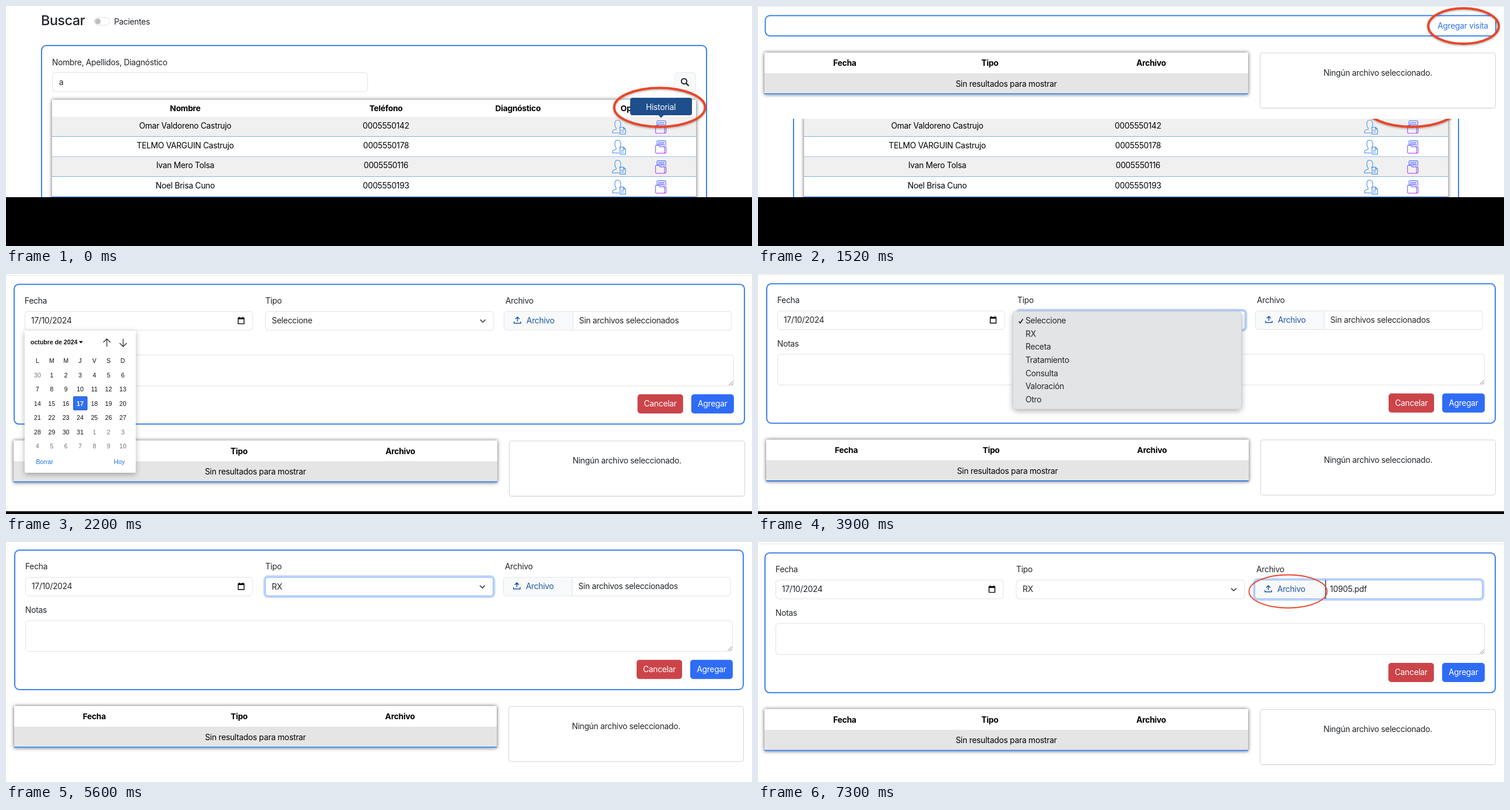
Write an HTML page that moves like this. It is 1280 by 413 pixels and loops after 8000 ms.

```html
<!DOCTYPE html>
<html lang="es">
<head>
<meta charset="utf-8">
<title>Agregar visita</title>
<style>
  html, body { margin: 0; width: 100%; height: 100%; overflow: hidden; background: #fff; }
  svg { display: block; }
  text { font: 13.8px Inter, "Open Sans", sans-serif; letter-spacing: -.25px; fill: #212529; }
  .table { fill: #000; }
  .bold { font-weight: 700; fill: #000; }
  .mid { text-anchor: middle; }
  .title { font-size: 23.5px; font-weight: 500; letter-spacing: -.5px; }
  .white { fill: #fff; }
  .link { fill: #2f74e8; }
  .navy { fill: #1f56a5; }
  .cal { font: 10.6px "Liberation Sans", Arial, sans-serif; letter-spacing: 0; fill: #111; }
  .cal.strong { font-weight: 700; }
  .cal.dim { fill: #757575; }
  .cal.link { fill: #1a6fe0; }
  .cal.white { fill: #fff; }
</style>
</head>
<body>
<svg id="stage" width="1280" height="413" viewBox="0 0 1280 413"></svg>
<script>
const BLUE = '#3b82ec', BORDER = '#dee2e6', RED = '#e8472a', INK = '#212529';

const text = (x, y, s, cls = '') => `<text x="${x}" y="${y}" class="${cls}">${s}</text>`;
const mid = (x, y, s, cls = '') => text(x, y, s, 'mid ' + cls);
const box = (x1, y1, x2, y2, r, fill, stroke = 'none', extra = '') =>
  `<rect x="${x1}" y="${y1}" width="${x2 - x1}" height="${y2 - y1}" rx="${r}" fill="${fill}" stroke="${stroke}" ${extra}/>`;
const line = (d, stroke, width = 1, extra = '') =>
  `<path d="${d}" fill="none" stroke="${stroke}" stroke-width="${width}" ${extra}/>`;
const ring = (cx, cy, rx, ry, width, extra = '') =>
  `<ellipse cx="${cx}" cy="${cy}" rx="${rx}" ry="${ry}" fill="none" stroke="${RED}" stroke-width="${width}" ${extra}/>`;
const panel = (x1, y1, x2, y2) => box(x1, y1, x2, y2, 8, '#fff', BLUE, 'stroke-width="2"');
const field = (x1, y1, x2, y2) => box(x1, y1, x2, y2, 5, '#fff', BORDER);
const place = (x, y, scale, content) =>
  `<g transform="translate(${x} ${y}) scale(${scale}) translate(-14 -16)">${content}</g>`;
const focus = (x1, y1, x2, y2) =>
  box(x1 - 1.5, y1 - 1.5, x2 + 1.5, y2 + 1.5, 6, 'none', '#c2d7fe', 'stroke-width="4"') +
  box(x1, y1, x2, y2, 5, 'none', '#86b7fe');

const defs = `<defs>
  <filter id="glow" x="-10%" y="-30%" width="120%" height="160%">
    <feDropShadow dx="0" dy="0" stdDeviation="3" flood-color="#000" flood-opacity=".65"/></filter>
  <filter id="lift" x="-20%" y="-20%" width="140%" height="140%">
    <feDropShadow dx="0" dy="3" stdDeviation="5" flood-color="#000" flood-opacity=".3"/></filter>
  <filter id="soft" x="-10%" y="-20%" width="120%" height="140%">
    <feDropShadow dx="0" dy="1.5" stdDeviation="1.5" flood-color="#000" flood-opacity=".3"/></filter>
  <linearGradient id="violet" gradientUnits="userSpaceOnUse" x1="0" y1="0" x2="0" y2="23">
    <stop offset="0" stop-color="#4a7cf2"/><stop offset="1" stop-color="#c04df5"/></linearGradient>
</defs>`;

// ---- patient search -------------------------------------------------
const patients = [
  ['Omar Valdoreno Castrujo', '0005550142'],
  ['TELMO VARGUIN Castrujo', '0005550178'],
  ['Ivan Mero Tolsa', '0005550116'],
  ['Noel Brisa Cuno', '0005550193'],
];

const personIcon = (x, y) => `<g transform="translate(${x} ${y})">` +
  line('M7 14V16Q.5 17.5 .5 20.5V22.5H12M7 14C4 11 3 .5 9.5 .5S16 11 12.5 14', '#5a9cee', 1.2) +
  line('M13.5 12.5H19.5L23 16V24.5H13.5ZM19.5 12.5V16H23M15.5 18H20M15.5 21H20', '#4a90ea', 1.2) + '</g>';
const folderIcon = (x, y) => `<g transform="translate(${x} ${y})">` +
  line('M3 8V2Q3 .5 4.5 .5H17Q18 .5 18 2V10M5 3.5H16M5 8V6H15V10M7 8H13' +
       'M1.5 8.5H6L8 11H16V22H2.5Q.5 22 .5 20V9.5Q.5 8.5 1.5 8.5ZM16 12H18.5V20Q18.5 22 16 22', 'url(#violet)', 1.2) + '</g>';

function search() {
  const rowHeight = 34.4;
  const rows = patients.map(([name, phone], i) => {
    const y = 190.5 + i * rowHeight, base = y + 20;
    return box(79, y, 1184, y + rowHeight, 0, i % 2 ? '#fff' : '#f0f0f0') +
      line(`M79 ${y + rowHeight}H1184`, '#4a8fe6', 1.2) +
      mid(307.5, base, name, 'table') + mid(652, base, phone, 'table') +
      personIcon(1040, y + 5.5) + folderIcon(1114, y + 6.5);
  }).join('');
  return text(60, 33, 'Buscar', 'title') +
    box(151, 19.5, 178, 33, 6.75, '#fff', '#dcdee1') +
    '<circle cx="157.5" cy="26.5" r="5" fill="#bfbfbf"/>' +
    text(185.5, 32, 'Pacientes') +
    panel(61, 68, 1202, 420) +
    text(79, 102, 'Nombre, Apellidos, Diagnóstico') +
    field(79.5, 114.5, 620.5, 147.5) + text(91, 136, 'a') +
    box(1147, 114.5, 1183.5, 147.5, 5, '#f8f9fa', '#e6e8ea') +
    line('M1166.8 132.8L1171.5 137.5', INK, 2.4) +
    `<circle cx="1163.5" cy="129.5" r="4.6" fill="none" stroke="${INK}" stroke-width="2"/>` +
    box(79, 161.5, 1184, 420, 0, '#fff', 'none', 'filter="url(#glow)"') +
    mid(307.5, 181, 'Nombre', 'bold') + mid(652, 181, 'Teléfono', 'bold') +
    mid(878.5, 181, 'Diagnóstico', 'bold') + text(1054.5, 181, 'Opciones', 'bold') +
    rows +
    ring(1121.5, 174.5, 78, 33.5, 4, 'filter="url(#soft)"') +
    box(1071, 158, 1177, 188, 4, '#1f4e8c') +
    '<path d="M1119 187.5H1129L1124 192.5Z" fill="#1f4e8c"/>' +
    mid(1123.5, 178.5, 'Historial', 'white') +
    box(0, 329, 1280, 413, 0, '#000');
}

// ---- visit history --------------------------------------------------
const results = () =>
  box(14, 285, 842, 357, 0, '#fff', 'none', 'filter="url(#glow)"') +
  box(14, 320.5, 842, 356, 0, '#e5e5e5') + line('M14 356H842', BLUE, 2) +
  mid(151.5, 308, 'Fecha', 'bold') + mid(400, 308, 'Tipo', 'bold') + mid(676, 308, 'Archivo', 'bold') +
  mid(428, 343.5, 'Sin resultados para mostrar', 'table') +
  box(862.5, 285.5, 1265.5, 380.5, 4, '#fff', '#d0d3d6') +
  mid(1064, 324.5, 'Ningún archivo seleccionado.');

function history() {
  return search() + box(0, 0, 1280, 194, 0, '#fff') + line('M0 1H1280', '#e4e6e8') +
    panel(12.5, 16.5, 1266, 51.5) + text(1166, 39, 'Agregar visita', 'link') +
    place(11, -189.5, 1.0024, results()) +
    ring(1210.5, 34.5, 60.5, 30.5, 4, 'filter="url(#soft)"');
}

// ---- visit form -----------------------------------------------------
function form({ type = 'Seleccione', file = 'Sin archivos seleccionados', typeFocus, fileFocus }) {
  const dateIcon = line('M398.5 75H408.5V84.5H398.5Z', '#000', 1.4) + line('M398 75.3H409', '#000', 3) +
    line('M400.5 72.5V75M406.5 72.5V75', '#000', 1.4);
  const uploadIcon = line('M870.8 80.5V83.5H882.2V80.5M876.5 80.5V73M873 76.3L876.5 72.8L880 76.3',
    '#1f56a5', 1.5, 'stroke-linejoin="round"');
  return line('M-20 1.3H1300', '#e4e6e8') +
    panel(15, 16.7, 1265, 256.7) +
    text(33, 50, 'Fecha') + text(445, 50, 'Tipo') + text(856, 50, 'Archivo') + text(33, 125, 'Notas') +
    field(33.5, 63.5, 423, 95.5) + text(44, 84, '17/10/2024') + dateIcon +
    field(445, 63.5, 836, 95.5) + (typeFocus ? focus(445, 63.5, 836, 95.5) : '') +
    text(456, 84.3, type) + line('M813 77.5L817.3 81.8L821.6 77.5', '#343a40', 1.6) +
    field(853.5, 63.5, 1243, 95.5) +
    box(854, 64, 971, 95, 4.5, '#f8f9fa') + line('M971.5 63.5V95.5', BORDER) +
    (fileFocus ? focus(853.5, 63.5, 1243, 95.5) + line('M974.5 63V95.5', '#1d4f91', 1.6) : '') +
    uploadIcon + text(892, 83.5, 'Archivo', 'navy') + text(982, 84, file) +
    field(33.5, 138, 1246.5, 191) + line('M1238.5 190L1245.5 183M1242.5 190L1245.5 187', '#666', .9) +
    box(1082, 205.5, 1160, 238.5, 5, '#cb444a') + mid(1121, 227, 'Cancelar', 'white') +
    box(1174, 205.5, 1247, 238.5, 5, '#2f6cf6') + mid(1210.5, 227, 'Agregar', 'white') +
    results();
}

const floor = box(0, 408.3, 1280, 413, 0, '#000');

function calendar() {
  const colX = c => 54 + c * 24.4;
  const weekdays = [...'LMMJVSD'].map((d, c) => mid(colX(c), 153, d, 'cal')).join('');
  const days = Array.from({ length: 42 }, (_, k) => {
    const day = k === 0 ? 30 : k > 31 ? k - 31 : k;
    const cls = k === 17 ? 'white strong' : k === 0 || k > 31 ? 'dim' : '';
    return mid(colX(k % 7), 178 + 24.45 * Math.floor(k / 7), day, 'cal ' + cls);
  }).join('');
  return box(32, 97, 222.5, 342, 2, '#fff', 'none', 'filter="url(#lift)"') +
    text(42, 120.5, 'octubre de 2024', 'cal strong') +
    '<path d="M125 115.5H132L128.5 119.3Z"/>' +
    line('M173 125V111.5M167 117.5L173 111.5L179 117.5M201 111.5V125M195 119L201 125L207 119', '#222', 1.2) +
    weekdays + box(115.8, 211, 139.2, 234, 1, '#2f70f5', '#1b4fb5') + days +
    text(51.5, 327, 'Borrar', 'cal link') + text(185, 327, 'Hoy', 'cal link');
}

function typeMenu() {
  const items = ['Seleccione', 'RX', 'Receta', 'Tratamiento', 'Consulta', 'Valoración', 'Otro'];
  return box(437.5, 64, 829.5, 232.5, 6, '#e3e4e6', '#cfd0d2', 'filter="url(#lift)"') +
    line('M447.5 81.5L450 84.5L454.5 77.5', '#111', 1.5) +
    items.map((item, i) => text(459, 85 + 22.65 * i, item)).join('');
}

// ---- timeline -------------------------------------------------------
const LOOP = 8000;
const scenes = [
  [0, search()],
  [500, history()],
  [2200, place(13, 17, 1.0024, form({})) + calendar() + floor],
  [3900, form({ typeFocus: true }) + typeMenu() + floor],
  [5600, place(14, 13.3, 1, form({ type: 'RX', typeFocus: true }))],
  [7300, place(11, 18, 1.0024, form({ type: 'RX', file: '10905.pdf', fileFocus: true })) +
    ring(909.5, 85, 67, 28.5, 1.8)],
];

const stage = document.getElementById('stage');
stage.innerHTML = defs + scenes.map(([, content]) => `<g class="scene" display="none">${content}</g>`).join('');
const groups = stage.querySelectorAll('.scene');
const origin = performance.now();
let shown = -1;

function draw() {
  const time = (performance.now() - origin) % LOOP;
  const current = scenes.findLastIndex(([start]) => time >= start);
  if (current !== shown) {
    groups.forEach((g, i) => g.setAttribute('display', i === current ? 'inline' : 'none'));
    shown = current;
  }
  requestAnimationFrame(draw);
}
draw();
</script>
</body>
</html>
```
